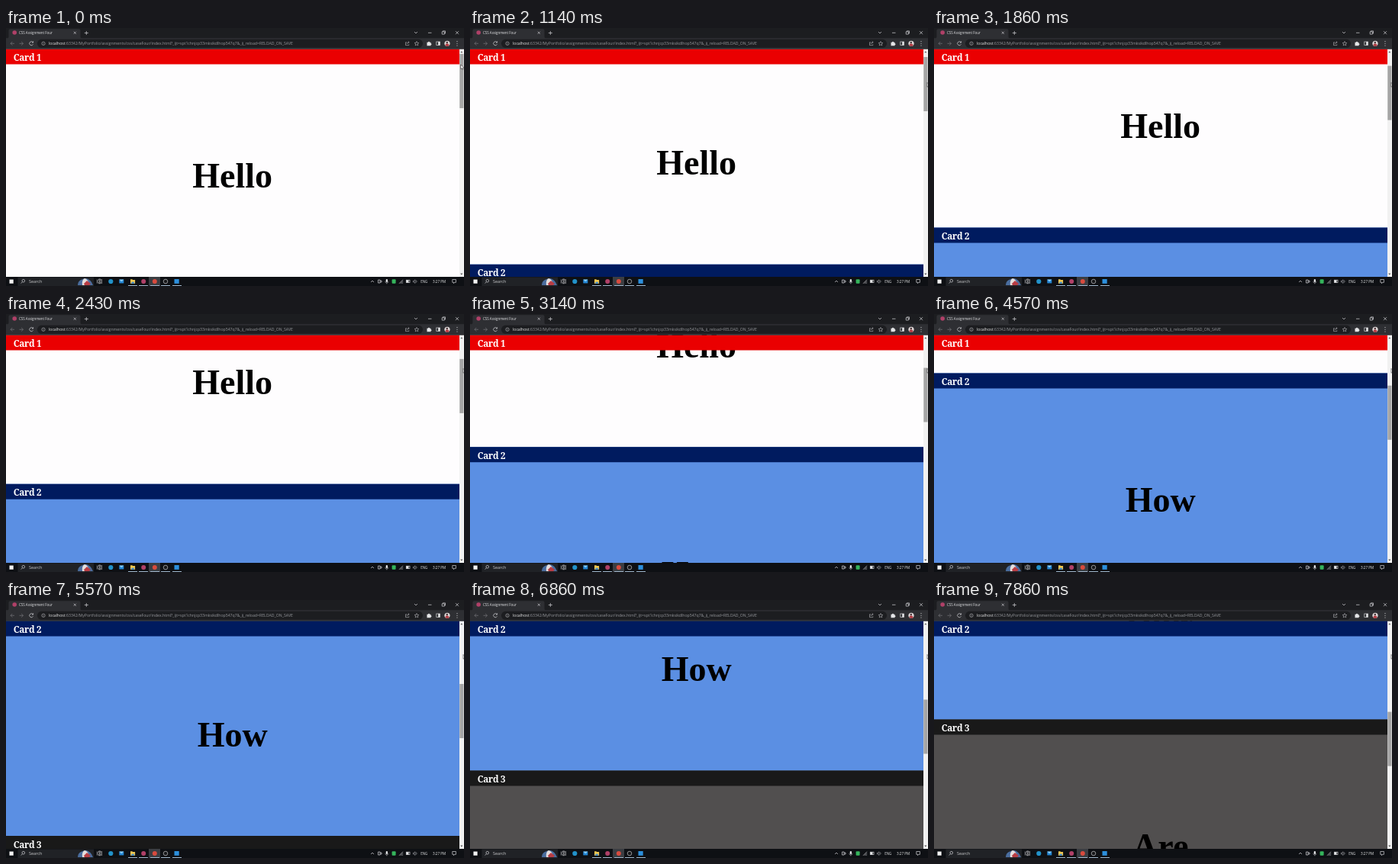
An HTML page that plays this animation: 600 by 338 pixels, repeating every 8000 ms.

```html
<!DOCTYPE html>
<html lang="en">
<head>
<meta charset="utf-8">
<title>Sticky cards</title>
<style>
  html, body { margin: 0; width: 100%; height: 100%; overflow: hidden; background: #000; }
  svg { display: block; width: 100%; height: 100%; }
  text { font-family: "Open Sans", "Noto Sans", sans-serif; }
  .word { font: bold 46px "Liberation Serif", "Times New Roman", serif; text-anchor: middle; }
  .title { font: bold 11.8px "Noto Serif", serif; letter-spacing: -.3px; fill: #fff; }
  .line { fill: none; stroke: #d4d5d8; stroke-width: .7; }
  .thin { stroke-width: .5; }
  .dim { stroke: #77787c; }
</style>
</head>
<body>
<svg viewBox="0 0 600 338" preserveAspectRatio="none">
  <rect width="600" height="338" fill="#fff"/>
  <g id="cards"></g>

  <g id="scrollbar">
    <rect x="594" y="27" width="6" height="299" fill="#f1f1f1"/>
    <path d="M595.2 32.2l1.6-1.8 1.6 1.8zM595.2 321.6l1.6 1.8 1.6-1.8z" fill="#505050"/>
    <rect id="thumb" x="594.3" width="5.2" height="71" fill="#a5a5a5"/>
  </g>

  <g id="browser">
    <rect width="600" height="27.5" fill="#1c1d20"/>
    <path d="M0 13.3h2q1.5 0 1.5-2v-8q0-2 2-2h90q2 0 2 2v8q0 2 1.5 2H600v14.2H0z" fill="#2e2f33"/>
    <rect x="41" y="14.8" width="505" height="11" rx="5.5" fill="#1c1d20"/>
    <circle cx="11.2" cy="6" r="2.8" fill="#b04068"/>
    <text x="17" y="8" font-size="4.47" fill="#e4e5e7">CSS Assignment Four</text>
    <path class="line" d="M88.8 4.8l3 3m0-3l-3 3M102.8 6.5h5m-2.5-2.5v5"/>
    <path class="line" d="M535 5l2 2 2-2M553 6.3h4.5M571.2 4.900h3.2v3.2h-3.2zM572.3 4.900v-1h3.2v3.2h-1M589 4.2l4 4m0-4l-4 4"/>
    <path class="line dim" d="M11 20.3H6m2.3-2.3L6 20.3l2.3 2.3M17.5 20.3h5m-2.3-2.3l2.3 2.3-2.3 2.3"/>
    <path class="line" d="M35.3 18.8a2.500 2.500 0 1 0 .2 2.5M35.6 17.3v1.8h-1.8"/>
    <circle class="line thin" cx="49" cy="20.3" r="2.2"/>
    <path class="line thin" d="M49 19.900v1.5M49 18.7v.5"/>
    <text x="56" y="22" font-size="5.17" fill="#96989c"><tspan fill="#eceded">localhost</tspan>:63342/MyPortfolio/assignments/css/caseFour/index.html?_ijt=spt1chnjcp33mksikdlhop547q7&amp;_ij_reload=RELOAD_ON_SAVE</text>
    <path class="line thin" d="M525 18.8h-1.5v3.8h4.3v-1.3M525 21q.3-2.3 3-2.3m-1.2-1.3l1.4 1.3-1.4 1.3"/>
    <path class="line thin" d="M538 17.5l.8 1.900 2 .2-1.5 1.3.5 2-1.8-1.1-1.8 1.1.5-2-1.5-1.3 2-.2z"/>
    <path d="M551.5 18.8h1.5a1 1 0 0 1 2 0h1.5v1.4a1 1 0 0 1 0 2v1.1h-5z" fill="#e4e5e7"/>
    <rect class="line" x="563.8" y="18" width="4.6" height="4.6"/>
    <rect x="566.2" y="18" width="2.2" height="4.6" fill="#e4e5e7"/>
    <circle cx="578" cy="20.3" r="3.6" fill="#dcd6d6"/>
    <path d="M575.3 22.7q.6-2.5 2.5-2.5t3 2.5q-2.6 2.4-5.5 0z" fill="#b03a42"/>
    <circle cx="577.8" cy="19" r="1.3" fill="#49383a"/>
    <path d="M591 17.6v.01M591 20.3v.01M591 23v.01" stroke="#e4e5e7" stroke-width="1.1" stroke-linecap="round"/>
  </g>

  <g id="taskbar">
    <rect y="326" width="600" height="12" fill="#0e1014"/>
    <rect x="4.500" y="329.5" width="5.2" height="5.2" fill="#f2f2f2"/>
    <rect x="15.5" y="326.5" width="99.5" height="11.5" fill="#202226"/>
    <circle class="line" cx="22.8" cy="331.2" r="1.8"/>
    <path class="line" d="M21.5 332.6l-1.8 1.9"/>
    <text x="30" y="334" font-size="5.5" fill="#c9cacc">Search</text>
    <path d="M94 337q0-5 4-7t7-2q6 1 9 9z" fill="#4a6d9e"/>
    <path d="M100 337q-1-7 3-9 5 1 6 9z" fill="#e5dedc"/>
    <path d="M102 335l4-4 5 4-2 2h-6z" fill="#b83c43"/>
    <path class="line" d="M119.5 329.5v5M121.5 329h2.3v2h-2.3zM121.5 332.7h2.3v2h-2.3zM125.3 329v6"/>
    <rect x="187" y="326" width="15" height="12" fill="#3b3e43"/>
    <circle cx="137.3" cy="332" r="3.1" fill="#2292c9"/>
    <rect x="148.3" y="329.6" width="6" height="4.8" fill="#2587d5"/>
    <path d="M148.3 329.6l3 2.7 3-2.7z" fill="#8fd0f5"/>
    <path d="M163 329.3h2.3l.8.8h3v4.7H163z" fill="#f0c750"/>
    <rect x="164.3" y="332.7" width="3.6" height="2.1" fill="#3c8bd0"/>
    <circle cx="180.2" cy="332" r="3" fill="#b04068"/>
    <circle cx="194.8" cy="332" r="3" fill="#d84b3e"/>
    <circle cx="209" cy="332" r="2.8" fill="#17181a" stroke="#c4c5c8" stroke-width=".7"/>
    <rect x="220.5" y="329" width="6.2" height="5.8" fill="#2c8fdc"/>
    <g id="running"></g>
    <path class="line" d="M478 333l2-2 2 2"/>
    <path class="line" d="M487.5 330h2.5v4h-2.5zM490 331h2v2h-2"/>
    <rect x="497.7" y="329" width="2.3" height="4" rx="1.1" fill="#e4e5e7"/>
    <path class="line thin" d="M496.8 332q0 2 2 2t2-2M498.8 334v1.3"/>
    <rect x="505.6" y="329.3" width="5" height="5.4" rx="1" fill="#35b45c"/>
    <path class="line" d="M515 334.8l5-5M517 334.8l3-3M519 334.8l1-1"/>
    <rect class="line" x="524.3" y="330.2" width="4.7" height="3.4"/>
    <path d="M524.3 330.2h3.2v3.4h-3.2z" fill="#e4e5e7"/>
    <path class="line thin" d="M533.5 331.2h1l1.5-1.4v4.6l-1.5-1.4h-1zM537.5 330.5q1.2 1.5 0 3"/>
    <text x="543.2" y="333.8" font-size="4.5" fill="#e8e9ea">ENG</text>
    <text x="559" y="333.8" font-size="4.6" fill="#e8e9ea">3:27 PM</text>
    <path class="line" d="M584.8 329.5h4.6v3.8h-1.7l-1.2 1.3v-1.3h-1.7z"/>
  </g>

  <path id="pointer" d="M0 0v5.8l1.4-1.2 1 2.1 1-.5-1-2h1.8z" fill="#fff" stroke="#111" stroke-width=".5"/>
</svg>
<script>
const VIEW_TOP = 27.5, CARD_HEIGHT = 299, HEADER_HEIGHT = 20;
const FPS = 7, DURATION = 8000;
const byId = id => document.getElementById(id);
const clamp = (value, low, high) => Math.min(Math.max(value, low), high);
const move = (node, x, y) => node.setAttribute('transform', `translate(${x} ${y})`);

const cards = [
  { word: 'Hello', body: '#fefdfe', header: '#ea0001' },
  { word: 'How', body: '#5b8fe3', header: '#001b5f' },
  { word: 'Are', body: '#514f4f', header: '#191919' }
];

byId('cards').innerHTML = cards.map(({ word, body, header }, i) => `
  <g>
    <rect width="594" height="${CARD_HEIGHT + .5}" fill="${body}"/>
    <text class="word" x="296.7" y="181.8">${word}</text>
    <g>
      <rect width="594" height="${HEADER_HEIGHT}" fill="${header}"/>
      <text class="title" x="9.7" y="15.8">Card ${i + 1}</text>
    </g>
  </g>`).join('');
const cardNodes = [...byId('cards').children];

byId('running').innerHTML = [166, 180, 195, 209, 224].map(x =>
  `<rect x="${x - 6}" y="337" width="12" height="1" fill="#9fb6cb"/>`).join('');

// Scroll offset by tick: a gentle start, then a nearly steady speed.
const RAMP_START = 4, RAMP_END = 8.6, SPEED = 9.66;
const stops = [[8.6, 22.2], [13, 65], [22, 152.3], [32, 249], [39, 316.5], [48, 402], [55, 469]];

function scrollAt(tick) {
  if (tick < RAMP_END) {
    return SPEED * Math.max(0, tick - RAMP_START) ** 2 / (2 * (RAMP_END - RAMP_START));
  }
  const next = Math.max(1, stops.findIndex(([at]) => at >= tick));
  const [t0, s0] = stops[next - 1], [t1, s1] = stops[next];
  return s0 + (s1 - s0) * (tick - t0) / (t1 - t0);
}

function draw(time) {
  const tick = Math.min(55, Math.floor((time % DURATION + 3) * FPS / 1000));
  const scroll = scrollAt(tick);
  cardNodes.forEach((card, i) => {
    const top = VIEW_TOP + i * CARD_HEIGHT - scroll;
    move(card, 0, top);
    move(card.lastElementChild, 0, clamp(VIEW_TOP - top, 0, CARD_HEIGHT - HEADER_HEIGHT));
  });
  byId('thumb').setAttribute('y', 34 + scroll * .24);
  const pull = clamp((tick - 1) / 6, 0, 1);
  move(byId('pointer'), 595.8 + 3.2 * pull, 48 + 23.5 * pull);
}

const start = performance.now();
function loop() {
  draw(performance.now() - start);
  requestAnimationFrame(loop);
}
loop();
</script>
</body>
</html>
```
